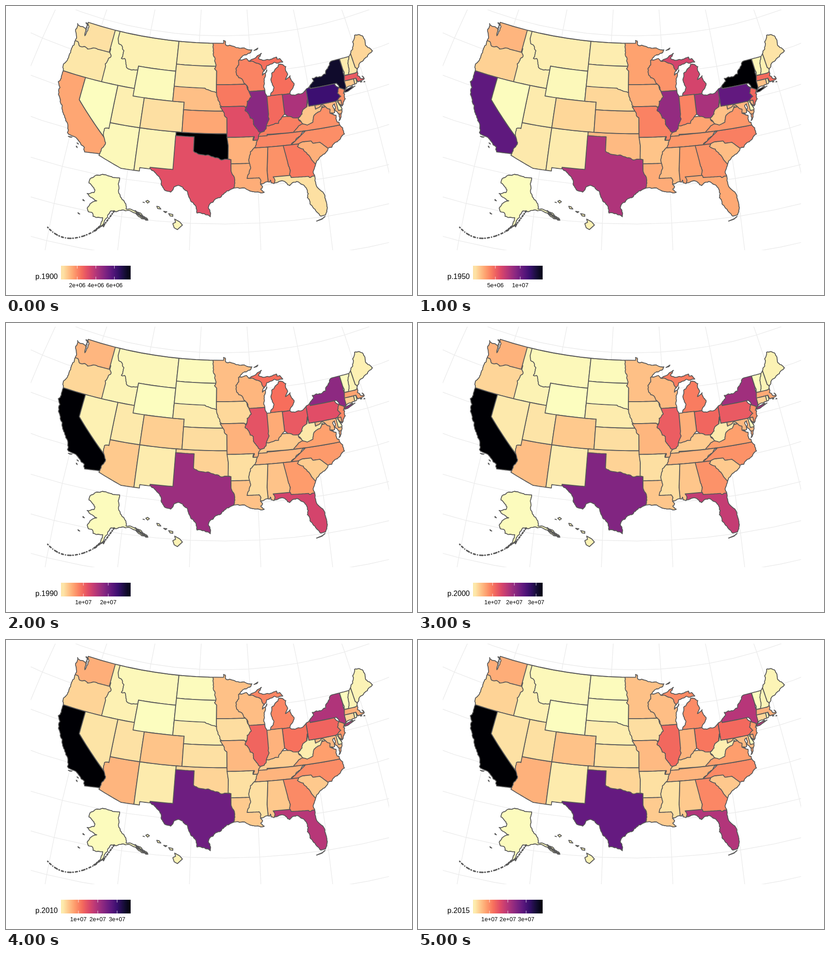
These frames come from a looping animation (886x632 px, 6 s). An HTML page:

```html
<!DOCTYPE html>
<html lang="en">
<head>
<meta charset="utf-8">
<title>State population</title>
<style>
  html, body { margin: 0; width: 100%; height: 100%; overflow: hidden; background: #fff; }
  svg { display: block; width: 886px; height: 632px; font-family: "Liberation Sans", Arial, sans-serif; }
  #grid { fill: none; stroke: #ebebeb; stroke-width: 1.4; }
  #map { stroke: #595959; stroke-width: 1.9; stroke-linejoin: round; stroke-linecap: round; }
  #map .line { fill: none; }
  #ticks line { stroke: #fff; stroke-width: 1; opacity: .8; }
  #ticks text { font-size: 12.8px; text-anchor: middle; }
</style>
</head>
<body>
<svg viewBox="0 0 886 632">
  <defs>
    <clipPath id="panel"><rect x="54" y="8" width="782" height="526"/></clipPath>
    <clipPath id="land"></clipPath>
    <linearGradient id="ramp"></linearGradient>
  </defs>
  <g id="grid" clip-path="url(#panel)"></g>
  <g id="map"><g id="mainland" clip-path="url(#land)"></g></g>
  <text id="title" x="64" y="597" font-size="16"></text>
  <rect x="120" y="568" width="152" height="30" fill="url(#ramp)"/>
  <g id="ticks"></g>
</svg>
<script>
const $ = id => document.getElementById(id);

function add(parent, tag, attrs, text = '') {
  const node = document.createElementNS('http://www.w3.org/2000/svg', tag);
  for (const key in attrs) node.setAttribute(key, attrs[key]);
  node.textContent = text;
  parent.append(node);
  return node;
}

let seed = 7;
const random = () => (seed = seed * 16807 % 2147483647) / 2147483647;

// Lambert azimuthal equal-area; longitudes are degrees west
const rad = Math.PI / 180, tilt = 37.5 * rad;
function globe([west, north]) {
  const a = (95.4 - west) * rad, b = north * rad;
  const sin = Math.sin(b), cos = Math.cos(b), c = Math.cos(a);
  const k = Math.sqrt(2 / (1 + Math.sin(tilt) * sin + Math.cos(tilt) * cos * c));
  return [472 + 951 * k * cos * Math.sin(a), 271 - 945 * k * (Math.cos(tilt) * sin - Math.sin(tilt) * cos * c)];
}
const flat = p => p;
const mix = (p, q, t) => p.map((v, i) => v + (q[i] - v) * t);

// Midpoint displacement for rivers and shores
function crinkle(p, q) {
  const dx = q[0] - p[0], dy = q[1] - p[1];
  if (Math.hypot(dx, dy) < 4) return [q];
  const off = (random() - .5) * .3, mid = mix(p, q, .5);
  const bend = [mid[0] - dy * off, mid[1] + dx * off];
  return [...crinkle(p, bend), ...crinkle(bend, q)];
}

// "x y,~x y": the edge leading to a point marked ~ is crinkled
function trace(text, project = globe, close = true) {
  const pts = text.split(',').map(s => ({ wild: s[0] === '~', at: s.replace('~', '').split(' ').map(Number) }));
  const out = [project(pts[0].at)];
  (close ? [...pts.slice(1), pts[0]] : pts.slice(1)).forEach(({ wild, at }, i) => {
    const from = pts[i].at;
    if (wild) out.push(...crinkle(project(from), project(at)));
    else for (let k = 1; k <= 10; k++) out.push(project(mix(from, at, k / 10)));
  });
  return 'M' + out.map(p => p.map(v => v.toFixed(1))).join(' ') + (close ? 'Z' : '');
}
const wild = text => text.replace(/,/g, ',~');
const box = (w, e, s, n) => `${w} ${n},${e} ${n},${e} ${s},${w} ${s}`;

const pacific = '117.12 32.53,117.3 33.1,118.4 33.75,119.2 34.15,120.5 34.45,120.65 35.15,121.9 36.6,122.5 37.6,123 38,123.7 38.9,123.8 39.8,124.4 40.44,124.1 41,124.2 42,124.55 42.84,124.1 44,123.95 46.2,124.1 46.9,124.7 48.4,123.1 48.15,122.7 48.1,122.5 47.2,122.3 48,122.76 49';
const lakes = '95.15 49,95.15 49.38,94.8 49.3,94.6 48.72,93.3 48.6,92 48.3,90.8 48.2,89.6 48,92.1 46.75,90.8 46.9,90.4 46.55,89.2 46.85,87.8 47.45,88.45 46.8,87.4 46.5,86.5 46.5,85 46.75,84.95 46.48,84.4 46.5,83.95 46,84.7 45.95,85.5 46.1,86.3 45.9,87 45.75,87.6 45.1,88 44.55,87.1 45.2,87.55 44.3,87.9 43.2,87.8 42.3,87.5 41.7,86.9 41.72,86.3 42.4,86.25 43,86.5 43.7,86.25 44.7,85.6 45.1,85 45.4,84.75 45.78,83.5 45.35,83.35 44.3,83.9 43.65,82.95 44.07,82.45 43,82.9 42.3,83.45 41.72,82.7 41.45,81.7 41.5,80.52 41.98,78.9 42.85,79.05 43.27,77.5 43.27,76.5 43.5,76.2 44,75.3 44.83,74.7 45';
const atlantic = '71.5 45.01,71.08 45.3,70.4 45.8,70 46.7,69.23 47.46,68.3 47.35,67.8 47.07,67.8 45.7,66.95 44.8,68.2 44.3,69.1 44,70.2 43.6,70.7 43.08,70.8 42.7,71 42.3,70.5 41.78,70 41.8,70.2 42.07,69.95 41.7,70.65 41.53,71.2 41.5,71.4 41.8,71.45 41.4,72.9 41.25,73.65 40.98,74.2 40.5,74 40.4,74.1 39.75,74.9 38.93,75.55 39.6,75.08 38.75,75.1 38.4,75.95 37.15,75.7 37.9,76.3 38.6,76.1 39.4,76.5 39.2,76.4 38.3,77 38.35,76.25 37.9,76.3 37,76 36.9,75.53 35.25,76.5 34.65,77.9 33.9,78.55 33.86,79.2 33.2,80.85 32.05,81.4 31.1,81.3 29.9,80.55 28.4,80.05 26.9,80.15 25.75,80.4 25.2';
const gulf = '81.1 25.13,81.8 26.1,82.75 27.8,82.65 28.8,83.6 29.8,84.1 30.1,85.2 29.65,86.3 30.4,88 30.25,88.05 30.6,88.2 30.35,89.6 30.15,89.3 29.8,89.6 29.5,89.1 29.05,90.1 29.15,91.2 29.3,91.8 29.6,93.85 29.7,94.7 29.4,95.1 29.1,96.4 28.35,97.2 27.7,97.4 27,97.15 25.95,99.1 26.4,99.5 27.5,100.4 28.5,101.4 29.77,102.3 29.88,102.7 29.7,103.15 28.98,104.4 29.55,104.9 30.6,106.5 31.78';
const shores = [
  [pacific, lakes, atlantic, gulf].map(wild).join() + ',108.2 31.78,108.2 31.33,111.07 31.33,114.8 32.5,114.72 32.72',
  '74 40.6,73.7 40.87,72.3 41.13,72.5 40.95,71.9 41.07,73.4 40.62',
  '89.2 47.9,88.4 48.18,88.6 48',
  '81.8 24.55,81 24.75,80.5 25,81 24.7',
  '70.8 41.38,70.5 41.36,70.6 41.42', '70.2 41.28,70 41.27,70.1 41.32',
  '120.2 34,119.6 34.02,119.9 33.95', '118.6 33.45,118.35 33.33,118.4 33.4', '118.6 33,118.4 32.85,118.5 33'
];

// Millions in 1900, 1950, 1990 and 2015, then a region cut off by the shore.
// Later regions cover earlier ones, so each shared border is drawn once.
const states = {
  ME: ['.69 .91 1.23 1.33', '71.08 45.4,70.97 43.4,~70.7 43.05,66 43,66 48,71.1 48'],
  NH: ['.41 .53 1.11 1.33', '71.5 45.2,71.08 45.4,70.97 43.4,~70.7 43.05,70.6 42.7,72.5 42.7,72.5 44'],
  NJ: ['1.88 4.84 7.73 8.96', '75.7 39.3,75.7 41.4,74.7 41.36,73.9 41,73.5 40.5,74.5 38.5'],
  NY: ['7.27 14.83 17.99 19.8', '80 42,75 42,~74.7 41.36,73.92 41,74.05 40.5,71.8 40.4,71.8 41.12,73.65 40.95,73.5 41.2,73.26 42.75,~73.25 43.6,73.4 45.3,80 45.3'],
  VT: ['.34 .38 .56 .63', '73.35 45.2,71.5 45.2,~72.05 44.2,~72.45 42.73,73.26 42.75,~73.25 43.6'],
  MA: ['2.81 4.69 6.02 6.79', '73.5 42.04,73.26 42.75,71.3 42.7,~70.8 42.87,69.6 42.8,69.6 41.2,71.15 41.2,71.38 42.02'],
  CT: ['.91 2.01 3.29 3.59', '73.5 42.04,71.8 42.02,71.85 41.2,73.7 40.97,73.5 41.2'],
  RI: ['.43 .79 1 1.06', '71.8 42.02,71.38 42.02,~71.15 41.4,71.86 41.2'],
  MD: ['1.19 2.34 4.78 6.01', box(79.48, 74.9, 37.95, 39.72)],
  DE: ['.19 .32 .67 .95', '75.79 39.72,~75.42 39.82,75.4 39.3,74.9 38.45,75.7 38.46'],
  PA: ['6.3 10.5 11.88 12.8', '80.52 42.4,79.76 42.4,79.76 42,75.35 42,~74.7 41.36,~75.2 40.7,~74.75 40.2,~75.42 39.82,75.79 39.72,80.52 39.72'],
  SC: ['1.34 2.12 3.49 4.9', '83.1 35.2,78 35.2,78.5 33,80.7 31.8,~81.4 32.7,~81.95 33.5,~83.35 34.7'],
  NC: ['1.89 4.06 6.63 10.04', '84.32 35,83.1 35,~82.3 35.2,81.05 35.15,80.8 34.82,79.67 34.8,78.5 33.8,75 34,75 36.55,81.7 36.59'],
  VA: ['1.85 3.32 6.19 8.38', '83.7 36.6,75 36.55,75 38,76.3 37.95,~77.2 38.35,~77.05 38.85,~77.75 39.3,82.5 39'],
  TN: ['2.02 3.29 4.88 6.6', '90.4 35,84.32 35,~82.9 35.95,~81.68 36.6,90 36.6'],
  KY: ['2.15 2.95 3.69 4.43', '89.6 36.5,88.06 36.5,88.06 36.68,83.7 36.6,~81.97 37.54,~82.6 38.2,82.4 38.8,89.3 38.8'],
  AL: ['1.83 3.06 4.04 4.86', '88.2 35,84.9 35,84.9 30,88.4 30,88.47 31.9,88.1 34.9'],
  FL: ['.53 2.77 12.94 20.27', '87.6 31,79.8 31,79.8 24,87.45 24,87.45 30.3,~87.4 30.7'],
  GA: ['2.22 3.45 6.48 10.22', '85.6 35,83.1 35,~83.35 34.7,~81.95 33.5,~81.4 32.7,80.7 31.8,81 30.72,~82.05 30.4,~82.2 30.57,84.86 30.7,~85.05 31.2,~85.1 32.3,85.18 32.87'],
  MS: ['1.55 2.18 2.57 2.99', '91.2 35,88.2 35,88.1 34.9,88.47 31.9,88.4 30,91.7 30,91.7 33'],
  LA: ['1.38 2.68 4.22 4.67', '94.04 33.02,91.15 33,~91 32.3,~91.6 31,89.73 31,~89.55 30.18,88.5 30,88.5 28.5,94.04 28.5'],
  MI: ['2.42 6.37 9.3 9.92', box(90.5, 82, 41.73, 48.5)],
  OH: ['4.16 7.95 10.85 11.61', '84.81 41.7,83.4 41.74,82 42.2,80.52 42.2,80.52 40.64,~80.85 39.7,~82.2 38.6,~82.6 38.42,~83.7 38.65,~84.81 39.1'],
  WV: ['.96 2.01 1.79 1.84', '80.52 40.64,80.52 39.72,79.48 39.72,79.48 39.2,~78.4 39.6,~77.75 39.3,~78.35 39.4,~78.87 38.78,~79.65 38.55,~80.3 37.55,~81.3 37.3,~81.97 37.54,~82.6 38.2,~82.2 38.6,~81.75 39.2,~80.85 39.7'],
  IN: ['2.52 3.93 5.54 6.62', '87.7 41.76,84.81 41.76,84.81 39.1,~85.4 38.7,~86 38,~87 37.9,~88.05 37.85'],
  ID: ['.16 .59 1.01 1.66', box(117.4, 111.05, 42, 49)],
  OR: ['.41 1.52 2.84 4.03', '125 46.5,116.92 46.5,116.92 46,~116.5 45.5,~117.2 44.4,117.03 44.1,117.03 42,125 42'],
  WA: ['.52 2.38 4.87 7.17', '125.5 49.1,117.03 49.1,117.03 46,119 46,~121.2 45.65,~122.8 45.7,~123.4 46.2,125 46.2'],
  MT: ['.24 .59 .8 1.03', '116.05 49,104.05 49,104.05 45,111.05 45,111.05 44.5,~113 44.45,~113.45 44.95,~113.9 45.65,~114.5 45.55,~114.4 46.65,~115.7 47.4,116.05 48'],
  AZ: ['.12 .75 3.67 6.83', box(115, 109.05, 31, 37)],
  UT: ['.28 .69 1.72 3', box(114.04, 109.05, 37, 42)],
  WY: ['.09 .29 .45 .59', box(111.05, 104.05, 41, 45)],
  CA: ['1.49 10.59 29.76 39.15', '125 42,120 42,120 39,114.6 35,~114.14 34.3,~114.72 32.72,117 32,125 32'],
  NV: ['.04 .16 1.2 2.89', '120 42,114.04 42,114.04 36.2,~114.75 36.1,~114.6 35,120 39'],
  NM: ['.2 .68 1.52 2.09', box(109.05, 103, 31, 37)],
  CO: ['.54 1.33 3.29 5.46', box(109.05, 102.05, 37, 41)],
  ND: ['.32 .62 .64 .76', box(104.05, 96.5, 45.94, 49)],
  SD: ['.4 .65 .7 .86', box(104.05, 96.45, 42.4, 45.94)],
  OK: ['7.9 2.23 3.15 3.91', '103 37,94.62 37,94.43 35.4,94.48 33,103 33'],
  KS: ['1.47 1.91 2.48 2.91', box(102.05, 94.62, 37, 40)],
  MN: ['1.75 2.98 4.38 5.49', '97.23 49,~96.8 47,~96.6 46,~96.85 45.6,96.45 45.3,96.45 43.5,91.2 43.5,91.8 46.7,89.4 47.9,89.4 50,97.23 50'],
  WI: ['2.07 3.44 4.89 5.77', '92.29 46.7,92.29 46.1,~92.85 45.6,~92.75 44.75,~91.22 43.5,~90.64 42.51,86.8 42.51,86.8 45.4,87.65 45.1,~87.85 45.35,~88.1 45.9,~90.4 46.55,90.2 47.3,91.9 46.76'],
  IA: ['2.23 2.62 2.78 3.12', '96.45 43.5,91.22 43.5,~90.64 42.5,90 41.5,91.4 40.4,~91.73 40.6,96.45 40.58'],
  NE: ['1.07 1.33 1.58 1.9', '104.05 43,98.5 43,~97.9 42.8,~96.4 42.45,~95.9 41.2,~95.3 40,102.05 40,102.05 41,104.05 41'],
  MO: ['3.11 3.96 5.12 6.08', '95.77 40.58,91.73 40.6,~91.4 40.4,90 39.5,89.15 37,~89.5 36.5,~89.7 36,90.4 36,~90.15 36.5,94.62 36.5,94.62 39.1,~95.3 40'],
  AR: ['1.31 1.91 2.35 2.98', '94.62 36.5,90.15 36.5,~90.4 36,89.7 36,~90.3 35,~91.1 33.9,~91.15 33,94.04 33,94.04 33.55,94.48 33.64,94.43 35.4'],
  TX: ['3.05 7.71 16.99 27.47', '103.04 36.5,100 36.5,100 34.6,~98.1 34.1,~96.5 33.8,~94.5 33.6,94.04 33.55,94.04 32,~93.55 31.2,~93.8 29.7,93.8 25,107 25,106.62 32,103.06 32'],
  IL: ['4.82 8.71 11.43 12.86', '90.64 42.51,87 42.51,87.53 41.7,87.53 39.35,~87.5 38.7,~88.05 37.85,~88.5 37.1,~89.15 37,~89.5 37.3,~90.2 38.2,~90.15 38.75,~90.7 39,~91.5 40,~91.1 40.7,~91.05 41.2,~90.3 41.75']
};

// Insets in stage pixels
const insets = {
  AK: ['.06 .13 .55 .74', [wild('248 376,262 444,280 448,296 455,309 467,296 465,278 452,254 446,240 450,229 448,221 463,214 473,196 489,210 470,211 463,190 460,189 453,180 450,178 440,183 433,198 426,187 419,177 410,192 408,194 402,181 387,186 376,211 368,233 375'), '168 423,171 426,168 425', '157 452,161 455,158 454', '211 481,216 477,213 483']],
  HI: ['.15 .5 1.11 1.43', ['305 427,309 425,313 428,309 431', '299 429,302 430', '329 438,334 439,338 444,331 443', '344 449,351 450,348 452', '355 454,364 456,364 460,358 459', '368 466,379 472,385 479,374 489,367 485,364 476,370 473']]
};

const grid = $('grid'), map = $('map');
for (let lon = 60; lon <= 140; lon += 10) add(grid, 'path', { d: trace(`${lon} 60,${lon} 10`, globe, false) });
for (let lat = 15; lat <= 55; lat += 5) add(grid, 'path', { d: trace(`145 ${lat},95 ${lat},45 ${lat}`, globe, false) });

const coast = shores.map(s => trace(s)).join('');
add($('land'), 'path', { d: coast });

function region(parent, figures, d) {
  const [a, b, c, e] = figures.split(' ').map(Number);
  const since1990 = t => c + (e - c) * t;
  return { people: [a, b, c, since1990(.4), since1990(.8), e], path: add(parent, 'path', { d }) };
}
const regions = Object.values(states).map(([figures, ring]) => region($('mainland'), figures, trace(ring)));
add(map, 'path', { class: 'line', d: coast });
for (const [figures, rings] of Object.values(insets)) {
  regions.push(region(map, figures, rings.map(r => trace(r, flat)).join('')));
}

// Island chains
for (const [d, dash, width] of [
  ['M91 484Q112 507 138 508T197 490', '1 5 4 5 0 5 7 4', 3.2],
  ['M192 492L216 476L238 446', '3 4 1 4', 3.4],
  ['M282 448L297 460L309 468M284 453L306 468', '7 3 2 3', 3.2],
  ['M175 37L178 40L174 54', '2 3', 3]
]) add(map, 'path', { class: 'line', d, 'stroke-dasharray': dash, style: `stroke-width:${width}` });

const magma = ['fcfdbf', 'fece91', 'fe9f6d', 'f76f5c', 'de4968', 'b63679', '8c2981', '641a80', '3b0f70', '140e36', '000004']
  .map(hex => [0, 2, 4].map(i => parseInt(hex.slice(i, i + 2), 16)));

function shade(t) {
  const pos = Math.min(1, Math.max(0, t)) * 10, i = Math.min(9, Math.floor(pos));
  return `rgb(${mix(magma[i], magma[i + 1], pos - i).map(Math.round)})`;
}

const years = [1900, 1950, 1990, 2000, 2010, 2015];
const nice = x => [.5, 1, 2, 5, 10].find(n => n >= x);

function show(index) {
  const values = regions.map(r => r.people[index]);
  const low = Math.min(...values), high = Math.max(...values), span = high - low;
  const color = v => shade((v - low) / span);
  regions.forEach((r, i) => r.path.setAttribute('fill', color(values[i])));
  $('title').textContent = 'p.' + years[index];

  // The bar is split into equal bins of a round size
  const step = nice(span / 20), unit = nice(span / 5);
  const first = Math.ceil(low / step), bins = Math.floor(high / step) - first + 1;
  const place = v => (v / step - first + .5) / bins;
  $('ramp').replaceChildren();
  for (let k = 0; k < bins; k++) {
    const v = (first + k) * step;
    add($('ramp'), 'stop', { offset: place(v), 'stop-color': color(v) });
  }
  $('ticks').replaceChildren();
  for (let v = unit; v <= high && place(v) < 1; v += unit) {
    const x = 120 + 152 * place(v);
    for (const y of [568, 592]) add($('ticks'), 'line', { x1: x, x2: x, y1: y, y2: y + 6 });
    add($('ticks'), 'text', { x, y: 614.5 }, (v * 1e6).toExponential().replace('+', '+0'));
  }
}

let shown = -1;
const start = performance.now();
function tick() {
  const index = Math.floor((performance.now() - start) / 1000) % years.length;
  if (index !== shown) show(shown = index);
  requestAnimationFrame(tick);
}
tick();
</script>
</body>
</html>
```
